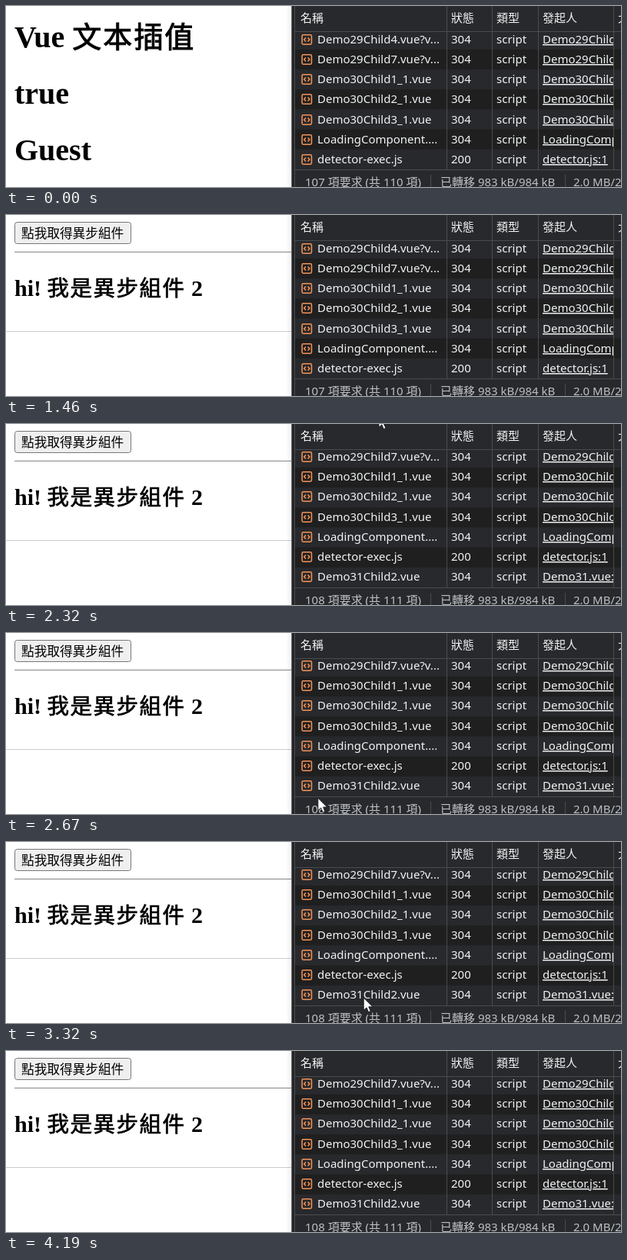
Recreate the animation shown at these times as an HTML page. Size 800x237 px, loop 5.32 s.

```html
<!DOCTYPE html>
<html lang="zh-Hant">
<head>
<meta charset="utf-8">
<style>
  html, body { margin: 0; width: 100%; height: 100%; overflow: hidden; background: #fff; }
  svg { display: block; width: 800px; height: 237px; }
  text { white-space: pre; }
  .ui { font: 15px "Noto Sans", "Noto Sans CJK TC", "Noto Sans CJK", sans-serif; fill: #f1f3f4; }
  .link { text-decoration: underline; }
  .dim { fill: #bdc1c6; }
  .page { font-family: "Liberation Serif", serif; font-weight: bold; }
  .h1 { font-size: 40px; }
  .h2 { font-size: 30px; }
  .han {
    font-family: "Noto Sans CJK TC", "Noto Sans CJK", sans-serif; font-weight: 400;
    font-size: .95em; letter-spacing: .0526em; stroke: #000; stroke-width: .025em;
  }
  .btn { font: 16.67px "Noto Sans CJK TC", "Noto Sans CJK", sans-serif; }
</style>
</head>
<body>
<svg viewBox="0 0 800 237" xmlns="http://www.w3.org/2000/svg">
  <defs>
    <clipPath id="body"><rect x="376" y="34" width="424" height="180"/></clipPath>
    <clipPath id="initiator"><rect x="692" y="34" width="98" height="180"/></clipPath>
    <linearGradient id="shade">
      <stop offset="0" stop-opacity="0"/>
      <stop offset="1" stop-opacity=".06"/>
    </linearGradient>
    <g id="icon" fill="none" stroke="#f69457" stroke-width="1.5">
      <rect x="-6.2" y="-6.2" width="12.4" height="12.4" rx="1.6"/>
      <path d="M-1.3 -2.6L-3.6 0L-1.3 2.6M1.3 -2.6L3.6 0L1.3 2.6"/>
    </g>
  </defs>
  <rect width="800" height="237" fill="#fff"/>
  <g id="before" class="page"></g>
  <g id="after" class="page">
    <rect x="11.5" y="9.5" width="151" height="28" rx="3" fill="#efefef" stroke="#767676"/>
    <rect x="11" y="48" width="360" height="1" fill="#858585"/>
    <rect y="152" width="371" height="1" fill="#ccc"/>
  </g>
  <rect x="364" width="7" height="237" fill="url(#shade)"/>
  <rect x="371" width="429" height="237" fill="#28292c"/>
  <g id="stripes" clip-path="url(#body)"></g>
  <g id="list0" clip-path="url(#body)"></g>
  <g id="list1" clip-path="url(#body)"></g>
  <g id="frame" fill="#4b4c4f"></g>
  <g id="status0"></g>
  <g id="status1"></g>
  <path id="cursor" d="M0 0V16.3L3.8 12.8L6.3 18.6L9 17.4L6.5 11.8H11.7Z" fill="#fff" stroke="#111" stroke-width=".8"/>
</svg>
<script>
const LOOP = 5320, PAGE_AT = 1460, LIST_AT = 1530, STEP = 69, PITCH = 26.15;
const $ = id => document.getElementById(id);

function add(parent, tag, attrs, content = "") {
  const el = document.createElementNS("http://www.w3.org/2000/svg", tag);
  for (const k in attrs) el.setAttribute(k, attrs[k]);
  el.textContent = content;
  parent.appendChild(el);
  return el;
}
const label = (parent, x, y, str, cls = "ui") => add(parent, "text", { x, y, class: cls }, str);
const bar = (parent, x, y, width, height, fill = "#4b4c4f") =>
  add(parent, "rect", { x, y, width, height, fill });

// Serif heading whose Chinese runs use the sans face
function heading(group, y, str, cls) {
  const line = label(group, 11, y, "", cls);
  for (const run of str.match(/\p{Script=Han}+|\P{Script=Han}+/gu))
    add(line, "tspan", /\p{Script=Han}/u.test(run) ? { class: "han" } : {}, run);
}
["Vue 文本插值", "true", "Guest"].forEach((s, i) => heading($("before"), 53.5 + 74 * i, s, "h1"));
label($("after"), 20, 29.5, "點我取得異步組件", "btn");
heading($("after"), 106, "hi! 我是異步組件 2", "h2");

// Network table
const rows = [
  ["Demo29Child4.vue?v...", "Demo29Child.vue"],
  ["Demo29Child7.vue?v...", "Demo29Child.vue"],
  ["Demo30Child1_1.vue", "Demo30Child.vue"],
  ["Demo30Child2_1.vue", "Demo30Child.vue"],
  ["Demo30Child3_1.vue", "Demo30Child.vue"],
  ["LoadingComponent....", "LoadingComponent.vue"],
  ["detector-exec.js", "detector.js:1", 200],
  ["Demo31Child2.vue", "Demo31.vue:12"]
];

function buildList(group, first, top) {
  const links = add(group, "g", { "clip-path": "url(#initiator)" });
  rows.slice(first, first + 7).forEach(([name, from, code = 304], i) => {
    const y = Math.round(top + i * PITCH);
    add(group, "use", { href: "#icon", x: 391.3, y: y - 5 });
    label(group, 405, y, name);
    label(group, 579, y, code);
    label(group, 638, y, "script");
    label(links, 698, y, from, "ui link");
  });
}
buildList($("list0"), 0, 48.9);
buildList($("list1"), 1, 48.1);

for (let i = 0; i < 6; i += 2) bar($("stripes"), 376, 57 + i * PITCH, 424, PITCH, "#1f1f20");

const frame = $("frame");
bar(frame, 371, 0, 5, 237, "#242527");
bar(frame, 371, 0, 1, 237, "#77787a");
bar(frame, 375, 0, 1, 237);
for (const y of [33, 214]) bar(frame, 376, y, 424, 1);
for (const x of [573, 632, 692, 790]) bar(frame, x, 0, 1, 214);
for (const x of [552, 727]) bar(frame, x, 221, 1, 16);
for (const [x, s] of [[383, "名稱"], [579, "狀態"], [638, "類型"], [698, "發起人"], [796, "大小"]])
  label(frame, x, 21, s);

const status = (group, x, s) => label(group, x, 235.5, s, "ui dim");
status($("status0"), 389, "107 項要求 (共 110 項)");
status($("status1"), 389, "108 項要求 (共 111 項)");
status(frame, 565, "已轉移 983 kB/984 kB");
status(frame, 738, "2.0 MB/2.1 MB");

// Pointer visits: key points as time, x, y
const visits = [
  { end: 470, path: [[260, 675, 220], [400, 386, -8]] },
  { end: 4190, path: [
    [2320, 485, -12], [2390, 510, 62], [2600, 424, 218], [2740, 385, 214], [2810, 404, 217],
    [3010, 425, 203], [3180, 491, 204], [3320, 457, 204], [3980, 534, 202], [4120, 672, 225]
  ] }
];

function pointerAt(t) {
  const visit = visits.find(v => t >= v.path[0][0] && t < v.end);
  if (!visit) return null;
  const { path } = visit, from = path[0][0];
  const held = from + Math.floor((t - from) / STEP) * STEP;
  const i = path.findLastIndex(p => p[0] <= held);
  const a = path[i], b = path[i + 1] || a;
  const k = (held - a[0]) / (b[0] - a[0] || 1);
  return [1, 2].map(n => a[n] + (b[n] - a[n]) * k);
}

const show = (id, on) => { $(id).style.display = on ? "" : "none"; };

function draw(t) {
  const paged = t >= PAGE_AT, listed = t >= LIST_AT;
  show("before", !paged);
  show("after", paged);
  for (const id of ["list", "status"]) {
    show(id + 0, !listed);
    show(id + 1, listed);
  }
  const at = pointerAt(t);
  show("cursor", at);
  if (at) $("cursor").setAttribute("transform", `translate(${at})`);
}

const start = performance.now();
function tick() {
  draw((performance.now() - start) % LOOP);
  requestAnimationFrame(tick);
}
tick();
</script>
</body>
</html>
```
